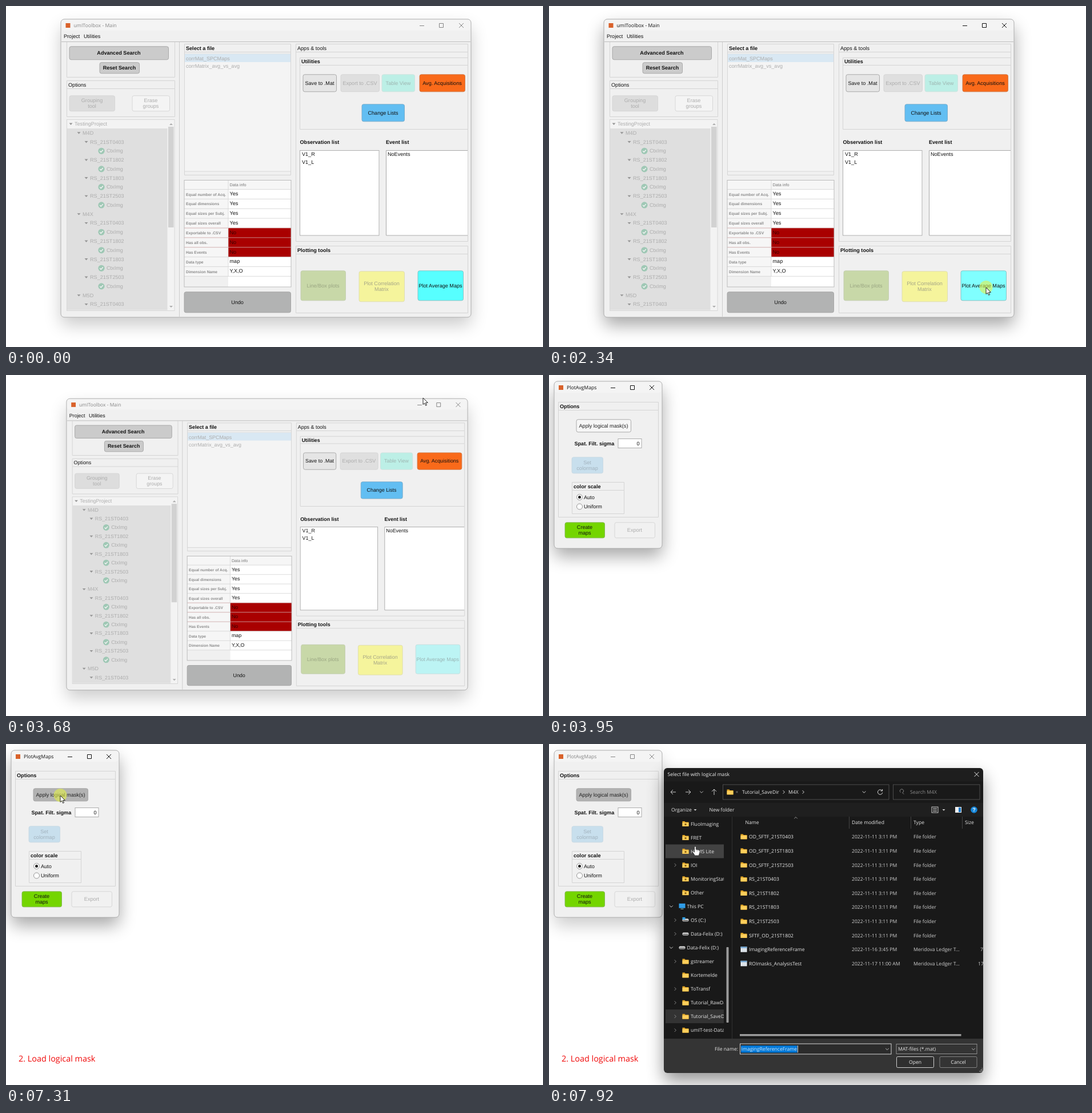
Recreate the animation shown at these times as an HTML page. Size 940 by 596 pixels, loop 7.99 s.

```html
<!DOCTYPE html>
<html lang="en">
<head>
<meta charset="utf-8">
<title>Average maps walkthrough</title>
<style>
html, body { margin: 0; width: 100%; height: 100%; overflow: hidden; background: #fff; }
svg { display: block; width: 100%; height: 100%; }
text { font-family: "Liberation Sans", Arial, sans-serif; white-space: pre; text-rendering: geometricPrecision; }
.ui { font-family: "Open Sans", "Noto Sans", sans-serif; }
.shadow { filter: blur(15px); opacity: var(--shade); }
.ink { fill: var(--ink); }
.inkline { fill: none; stroke: var(--ink); }
</style>
</head>
<body>
<svg id="stage" viewBox="0 0 940 596"></svg>
<script>
const LOOP = 7990;
const GREY = '#acacac', EDGE = '#d4d4d4';

// ---------- drawing helpers ----------
const box = (x, y, x2, y2, fill, stroke = 'none', r = 0) =>
  `<rect x="${x}" y="${y}" width="${x2 - x}" height="${y2 - y}" rx="${r}" fill="${fill}" stroke="${stroke}" stroke-width=".9"/>`;
const path = (d, stroke = EDGE, w = 1, fill = 'none') =>
  `<path d="${d}" fill="${fill}" stroke="${stroke}" stroke-width="${w}"/>`;
const text = (x, y, s, { size = 9.1, bold, fill = '#111', at = 'start', cls = '' } = {}) =>
  `<text x="${x}" y="${y}" font-size="${size}" font-weight="${bold ? 700 : 400}" fill="${fill}" text-anchor="${at}" class="${cls}">${s}</text>`;
const bold = (x, y, s) => text(x, y, s, { bold: true });
const ui = (x, y, s, fill = '#e6e6e6', size = 8.6) => text(x, y, s, { cls: 'ui', fill, size });
const group = (id, body, attrs = '') => `<g id="${id}" ${attrs}>${body}</g>`;

function button(x, y, x2, y2, fill, label, { ink = '#111', edge = '#a3a3a3', strong, id = '' } = {}) {
  const lines = label.split('|'), mid = (y + y2) / 2 + 3.1;
  const words = lines.map((s, i) =>
    text((x + x2) / 2, mid + (i - (lines.length - 1) / 2) * 10, s, { fill: ink, at: 'middle', bold: strong })).join('');
  return `<g ${id && `id="${id}"`}>${box(x + 1, y + .8, x2 - .5, y2 - .2, fill, edge, 3)}${words}</g>`;
}

function panel(x, y, x2, y2, title, strong = true) {
  return path(`M${x}.5 ${y}.5H${x2}.5V${y2}.5H${x}.5ZM${x}.5 ${y + 14}.5H${x2}.5`) +
    text(x + 3, y + 10.7, title, { bold: strong });
}

function frame(x, y, x2, y2, title, titleX, cy, marks) {
  const [lo, hi, end] = marks;
  return `<rect class="shadow" x="${x}" y="${y + 14}" width="${x2 - x}" height="${y2 - y}" rx="8"/>` +
    box(x, y, x2, y2, '#f0f0f0', '#a8a8a8', 6) +
    box(x + 1, y + 1, x2 - 1, y + 20, '#f4f4f4', 'none', 5) +
    box(titleX - 14, cy - 4, titleX - 6, cy + 4, '#d9622b') +
    text(titleX, cy + 3.2, title, { cls: 'ui ink', size: 8.7 }) +
    `<path class="inkline" d="M${lo} ${cy + .5}h8M${hi} ${cy - 3.5}h7v7h-7zM${end} ${cy - 4}l8 8m0-8l-8 8"/>`;
}

// ---------- main window ----------
function tree() {
  const rows = [[0, 'TestingProject']];
  for (const animal of ['M4D', 'M4X', 'M5D']) {
    rows.push([1, animal]);
    for (const run of ['0403', '1802', '1803', '2503']) rows.push([2, 'RS_21ST' + run], [3, 'CtxImg']);
  }
  let s = box(106.5, 198.5, 295, 532.5, '#f3f3f3', EDGE) + box(107, 214, 282.5, 531.5, '#dfdfdf') +
    box(284, 211, 293.5, 387, '#d2d2d2') +
    path('M286 208l3-3 3 3zM286 524l3 3 3-3z', 'none', 0, GREY);
  rows.slice(0, 21).forEach(([level, name], i) => {
    const y = 206 + i * 15.77, x = [120, 134, 147, 176][level];
    s += level < 3
      ? path(`M${x - 9.5} ${y - 1.5}h6l-3 3.4z`, 'none', 0, '#969696')
      : `<circle cx="167" cy="${y}" r="5.6" fill="#9fc8b5"/>` + path(`M164.2 ${y}l2 2.2 3.6-4`, '#f4f4f4', 1.4);
    s += text(x, y + 3, name, { fill: GREY });
  });
  return s;
}

function table() {
  const rows = [['Equal number of Acq.', 'Yes'], ['Equal dimensions', 'Yes'], ['Equal sizes per Subj.', 'Yes'],
    ['Equal sizes overall', 'Yes'], ['Exportable to .CSV', 'No'], ['Has all obs.', 'No'], ['Has Events', 'No'],
    ['Data type', 'map'], ['Dimension Name', 'Y,X,O']];
  const top = i => 320.5 + i * 16.88;
  let s = box(312, 304, 499, 491, '#f6f6f6') + box(389, 320.5, 499, 491, '#fff') + box(312, 472.5, 389, 491, '#f0f0f0') +
    text(391.5, 314.8, 'Data info', { size: 7.25, fill: '#777' });
  rows.forEach(([label, value], i) => {
    const y = top(i), no = value === 'No';
    if (no) s += box(389, y, 499, y + 16.88, '#a90000');
    s += text(315, y + 11.1, label, { size: 6.8, bold: true, fill: '#8c8c8c' }) +
      text(391.5, y + 10.8, value, { fill: no ? '#3a0000' : '#111' }) +
      path(`M312 ${y}H499`, no ? '#c9a0a0' : '#d2d2d2', .8);
  });
  return s + path(`M312 ${top(9)}H499M389 304V472.5`, EDGE, .8) + box(312, 304.5, 499, 491, 'none', '#b5b5b5');
}

const off = (ink, edge = EDGE) => ({ ink, edge });

const mainWindow = frame(96, 23, 814, 544, 'umIToolbox - Main', 118.5, 34, [724, 758.5, 793]) +
  text(101, 56.2, 'Project') + text(136, 56.2, 'Utilities') +
  path('M97 62.5H813', '#bdbdbd') + path('M303.5 63V543', '#cccccc') +
  path('M106.5 63V124.5H295.5V63') +
  button(110, 70, 285, 94, '#cbcbcb', 'Advanced Search', { strong: true }) +
  button(163, 98, 234, 118, '#cbcbcb', 'Reset Search', { strong: true }) +
  panel(106, 130, 295, 193, 'Options', false) +
  button(110, 156, 191, 184, '#dddddd', 'Grouping|tool', off(GREY)) +
  button(220, 156, 287, 184, '#f4f4f4', 'Erase|groups', off(GREY)) +
  tree() +
  panel(312, 66, 498, 295, 'Select a file') +
  box(312.5, 84, 498.5, 289, '#f4f4f4', EDGE) + box(313, 84, 498, 98, '#d9e8f3') +
  text(315, 95, 'corrMat_SPCMaps', { fill: GREY }) + text(315, 108.2, 'corrMatrix_avg_vs_avg', { fill: GREY }) +
  table() +
  button(311, 499, 499, 536, '#b2b3b3', 'Undo') +
  panel(507, 66, 808, 411, 'Apps &amp; tools', false) +
  path('M808 90.5H514.5V215.5H808M514 103.5H808') + bold(517, 100.2, 'Utilities') +
  button(519, 119, 579, 150, '#e5e5e5', 'Save to .Mat') +
  button(585, 119, 654, 150, '#dfdfdf', 'Export to .CSV', off(GREY)) +
  button(657, 119, 716, 150, '#bcefe6', 'Table View', off('#9db5b0', '#cfe2de')) +
  button(723, 119, 804, 150, '#f96a1a', 'Avg. Acquisitions', { edge: '#cf7745' }) +
  button(622, 171, 698, 202, '#62bef2', 'Change Lists', { edge: '#77a9c8' }) +
  bold(514.5, 241.3, 'Observation list') + bold(665, 241.3, 'Event list') +
  box(514.5, 252.5, 653, 401, '#fff', '#a8a8a8') + box(665, 252, 808, 401.5, '#fff') +
  path('M808 252.5H665.5V401H808', '#a8a8a8') +
  text(518, 262.3, 'V1_R') + text(518, 275.5, 'V1_L') + text(668, 262.3, 'NoEvents') +
  panel(507, 419, 808, 536, 'Plotting tools') +
  button(515, 462, 595, 515, '#c8d8a8', 'Line/Box plots', off('#9aa682', '#c3cdb0')) +
  button(617, 463, 698, 517, '#f5f49c', 'Plot Correlation|Matrix', off('#a5a587', '#dddcb0')) +
  button(720, 462, 801, 515, '#57ffff', 'Plot Average Maps', { id: 'plot', edge: '#83bfc1' });

// ---------- options window ----------
const radio = (y, label, on) =>
  `<circle cx="53.5" cy="${y}" r="5" fill="#fff" stroke="#8a8a8a" stroke-width=".9"/>` +
  (on ? `<circle cx="53.5" cy="${y}" r="2.5" fill="#222"/>` : '') + text(61, y + 3.2, label);

const optionWindow = frame(9, 11, 198, 303, 'PlotAvgMaps', 31, 22, [108, 142.5, 176]) +
  panel(16, 47, 191, 248, 'Options') +
  button(47, 77, 144, 100, '#f6f6f6', 'Apply logical mask(s)', { id: 'mask' }) +
  bold(44.5, 123.2, 'Spat. Filt. sigma') + box(121, 111.5, 162, 127.5, '#fff', '#a5a5a5') +
  text(158.5, 122.8, '0', { at: 'end' }) +
  button(39, 143, 95, 172, '#c8dfed', 'Set|colormap', off('#a2b2bd', '#c8d8e2')) +
  panel(40, 187, 131, 242, 'color scale') +
  radio(213.5, 'Auto', true) + radio(230, 'Uniform') +
  button(27, 257, 98, 285, '#74d500', 'Create|maps', { edge: '#83b552' }) +
  button(114, 257, 186, 285, '#f1f1f1', 'Export', off(GREY));

// ---------- file dialog ----------
const chevron = (x, y, turn = 0, c = '#bbb') =>
  `<path d="M-2.8 -1.4l2.8 2.8 2.8-2.8" fill="none" stroke="${c}" transform="translate(${x} ${y}) rotate(${turn})"/>`;
const folder = (x, y) =>
  path(`M${x} ${y - 4.5}h4l1.2 1.5h5.8v7.5h-11z`, 'none', 0, '#e0a526') + box(x, y - 2, x + 11, y + 4.2, '#ffcf5c');
const drive = (x, y) => box(x, y - 2.5, x + 11, y + 2.5, '#d8d8d8', 'none', 2) + box(x + 1, y, x + 10, y + 1.5, '#555');

function sidebar() {
  // [label, icon, chevron: 0 none, 1 closed, 2 open, top level]
  const rows = [['FluoImaging', 'b'], ['FRET', 'b'], ['HCMS Lite', 'b'], ['IOI', 'b', 1], ['MonitoringStation', 'b'], ['Other', 'b'],
    ['This PC', 'p', 2, 1], ['OS (C:)', 'o', 1], ['Data-Felix (D:)', 'd', 1], ['Data-Felix (D:)', 'd', 2, 1], ['gstreamer', 'f', 1],
    ['Kortemelde', 'f'], ['ToTransf', 'f', 1], ['Tutorial_RawData', 'f', 1], ['Tutorial_SaveDir', 'f', 1], ['umIT-test-Data', 'f', 1]];
  let s = box(204, 175.5, 306, 199.5, '#424242') + box(204, 464, 306, 488, '#333');
  rows.forEach(([label, icon, arrow, top], i) => {
    const y = 139.5 + i * 24.05, x = top ? 227.5 : 233.5;
    if (arrow) s += chevron(top ? 214 : 221, y, arrow === 1 ? -90 : 0, arrow === 1 ? '#888' : '#ccc');
    if (icon === 'p') s += box(x, y - 5, x + 11, y + 3, '#2f9de8') + box(x + 3, y + 4, x + 8, y + 5, '#9cc');
    else if (icon === 'f' || icon === 'b') s += folder(x, y) + (icon === 'b' ? box(x + 4, y - .5, x + 7, y + 2.5, '#8a6412') : '');
    else s += drive(x, y) + (icon === 'o' ? box(x, y - 5, x + 5, y - 1, '#35a4ea') : '');
    s += ui(top ? 241.5 : 248, y + 3.1, label);
  });
  return `<g clip-path="url(#sideClip)">${s}</g>` + box(310.5, 355, 314.5, 487, '#9b9b9b', 'none', 1) + path('M320.5 127V515', '#303030');
}

function files() {
  const names = ['OD_SFTF_21ST0403', 'OD_SFTF_21ST1803', 'OD_SFTF_21ST2503', 'RS_21ST0403', 'RS_21ST1802', 'RS_21ST1803',
    'RS_21ST2503', 'SFTF_OD_21ST1802', 'ImagingReferenceFrame', 'ROImasks_AnalysisTest'];
  const dates = { 8: '2022-11-16 3:45 PM', 9: '2022-11-17 11:00 AM' };
  let s = ui(343.5, 140.3, 'Name') + ui(530, 140.3, 'Date modified') + ui(638, 140.3, 'Type') + ui(728, 140.3, 'Size') +
    path('M525.5 127V148M633.5 127V148M723.5 127V148', '#444') + chevron(432, 129, 180, '#999');
  names.forEach((name, i) => {
    const y = 162 + i * 24.65, doc = i > 7;
    s += (doc ? box(335.5, y - 5, 346.5, y + 4.5, '#e8edf2') + box(335.5, y - 5, 346.5, y - 2.5, '#6fa3cf') +
      path(`M339.5 ${y - 2}v6M343 ${y - 2}v6`, '#aab6c0', .7) : folder(335.5, y)) +
      ui(350, y + 3.2, name) + ui(530, y + 3.2, dates[i] || '2022-11-11 3:11 PM', '#cfcfcf') +
      ui(638, y + 3.2, doc ? 'Meridova Ledger T...' : 'File folder', '#cfcfcf');
  });
  return s + ui(755, 362.4, '7', '#cfcfcf') + ui(751, 387, '17', '#cfcfcf');
}

const fileField = box(334.5, 524, 599, 542, '#2b2b2b', '#e8e8e8') + box(336, 527, 434.5, 539.5, '#0078d7') +
  ui(336.5, 536.4, 'ImagingReferenceFrame', '#d8ecff');

const emptyBody = box(203, 127, 319.5, 515, '#191919') + box(311, 140, 315, 363, '#8e8e8e') + path('M208 187.5H299', '#333') +
  box(334.5, 502.5, 748.5, 515, '#1b1b1b') + box(334.5, 507, 721, 510.5, '#8e8e8e') +
  box(202, 515, 760, 575, '#373737') + box(290, 526.5, 330.5, 539.5, '#fff') + fileField + box(585, 524, 599.5, 542, '#fff') +
  box(607.5, 524, 749.5, 541.5, '#fff') + box(607.5, 546, 674, 566, '#fff') + box(683, 546, 749.5, 566, '#fff') +
  box(748.5, 562.5, 760, 575, '#fff');

const fullBody = box(201, 65, 760, 515, '#191919') + box(201, 103, 760, 127, '#1f1f1f') +
  path('M222 84h-9m4-4l-4 4 4 4M239 84h9m-4-4l4 4-4 4M289 89v-10m-4 4l4-4 4 4', '#ccc') + chevron(267, 84) +
  box(304.5, 71, 595, 97, '#191919', '#535353') + folder(311.5, 84) + ui(327, 86, '«', '#999', 8) +
  group('crumbs', ui(338, 87.2, 'Tutorial_SaveDir') + chevron(411, 84, -90, '#ddd') + ui(419, 87.2, 'M4X') + chevron(445, 84, -90, '#ddd')) +
  chevron(551.5, 84, 0, '#ddd') + path('M583 81.5a4.2 4.2 0 1 0 .8 3.4M583.6 79v3h-3', '#ddd') +
  box(602.5, 71, 754, 97, '#191919', '#535353') + path('M618.6 85.1a3.2 3.2 0 1 0-3-.4M618.6 85.1l2.6 2.6', '#888') +
  ui(632, 87.2, 'Search M4X', '#8c8c8c') +
  ui(214, 118.3, 'Organize') + ui(280.5, 118.3, 'New folder') +
  path('M253.5 114h5l-2.5 2.8zM688.5 114h5l-2.5 2.8z', 'none', 0, '#ccc') +
  box(670, 110, 681, 120, 'none', '#ddd') + path('M672 112.5h7M672 115h7M672 117.5h7', '#ddd', .9) +
  box(711, 110, 722, 120, '#eee') + box(717, 111, 721, 119, '#1679c9') +
  '<circle cx="744" cy="115" r="5.8" fill="#1686d9"/>' + text(744, 118.2, '?', { at: 'middle', fill: '#fff', bold: true }) +
  sidebar() + files() + box(334, 507, 721.5, 510.5, '#9b9b9b') +
  box(201, 515, 760, 575, '#343434') + ui(290, 536.4, 'File name:') + fileField + path('M435.5 527V539.5', '#fff', .8) + chevron(592, 533.3) +
  box(608, 524.5, 749, 541.5, '#343434', '#9a9a9a') + ui(611, 536.4, 'MAT-files (*.mat)') + chevron(743, 533.3) +
  box(608.5, 546.5, 673.5, 565.5, '#2f2f2f', '#e2e2e2', 2) + box(684, 546.5, 749, 565.5, '#343434', '#8d8d8d', 2) +
  text(641, 559.2, 'Open', { cls: 'ui', size: 8.6, fill: '#eee', at: 'middle' }) +
  text(716.5, 559.2, 'Cancel', { cls: 'ui', size: 8.6, fill: '#eee', at: 'middle' }) +
  path('M753 572h6M755.5 569.5h3.5M757.5 567h1.5', '#aaa', 1.2);

const fileDialog = '<rect class="shadow" x="201" y="56" width="559" height="533" rx="8"/>' +
  `<g clip-path="url(#dialogClip)">${box(201, 42, 760, 575, '#fff')}${group('empty', emptyBody)}${group('full', fullBody)}` +
  box(201, 42, 760, 65.5, '#1e1e1e') + ui(207.5, 56.4, 'Select file with logical mask', '#f2f2f2') +
  path('M744.5 49l8 8m0-8l-8 8', '#eee') + '</g>';

// ---------- pointer ----------
const pointer = group('arrow', path('M0 0V11.6L2.7 9.1 4.6 13.4 6.5 12.6 4.6 8.4H8.4Z', '#111', .9, '#fff')) +
  group('hand', path('M-1.3 1.2a1.3 1.3 0 0 1 2.6 0V5.2l5 1.1q1.9.5 1.7 2.4L7.2 12.5 6.2 16H-.8L-2.4 13-5 9.6q.6-1.8 2.4-.7l1.3 1.3Z', '#222', .7, '#fff') +
    path('M2.8 6V8.5M5 6.6V8.8', '#555', .5));

const caption = (id, s) => group(id, text(22, 555, s, { cls: 'ui', size: 14.4, fill: '#f00808' }));

document.getElementById('stage').innerHTML =
  '<defs><clipPath id="sideClip"><rect x="203" y="127" width="103" height="388"/></clipPath>' +
  '<clipPath id="dialogClip"><rect x="201" y="42" width="559" height="533" rx="6"/></clipPath></defs>' +
  group('main', mainWindow) + group('options', optionWindow) + group('dialog', fileDialog, 'style="--shade:.42"') +
  caption('step1', '1. Open plot tool') + caption('step2', '2. Load logical mask') +
  '<circle id="click" r="11.5" fill="#e2f04a" opacity=".6"/>' + group('pointer', pointer);

// ---------- timing ----------
const $ = id => document.getElementById(id);
const during = (t, from, to) => t >= from && t < to;
const show = (id, on) => { $(id).style.display = on ? '' : 'none'; };

const firstMove = [[1050, 873, 592], [1180, 871, 587], [1320, 869, 585], [1600, 836, 548], [1980, 765, 492],
  [2500, 765, 492], [2700, 768, 430], [3100, 744, 110], [3400, 730, 40]];
const secondMove = [[6220, 575, 46], [6290, 575, 46], [6450, 642, 220], [6610, 560, 431], [6790, 260, 300],
  [6960, 24, 130], [7110, 95, 90], [7360, 95, 90], [7600, 239, 182], [7660, 239, 182], [7790, 242, 182], [7920, 256, 179]];
// time, scale, shift x, shift y, opacity
const minimise = [[3610, 1, 0, 0, 1], [3680, .978, 2, 12.5, 1], [3765, .978, 2, 12.5, 1], [3770, .86, 8, 80, .45], [3850, .7, 14, 150, 0]];
const openOptions = [[3820, .9, 0, 0, 0], [3950, 1, 0, 0, 1]];
const openDialog = [[7470, .88, 2.5, 5, 0], [7600, .957, 1, 2, 1], [7660, .957, 1, 2, 1], [7720, 1, 0, 0, 1]];

function at(track, t) {
  const next = track.findIndex(k => k[0] > t);
  if (next < 0) return track[track.length - 1].slice(1);
  if (next === 0) return track[0].slice(1);
  const a = track[next - 1], b = track[next], p = (t - a[0]) / (b[0] - a[0]);
  return a.slice(1).map((v, i) => v + (b[i + 1] - v) * p);
}

function pose(id, track, t, cx, cy) {
  const [scale, dx, dy, opacity] = at(track, t);
  show(id, opacity > 0);
  $(id).setAttribute('transform', `translate(${cx + dx} ${cy + dy}) scale(${scale}) translate(${-cx} ${-cy})`);
  $(id).setAttribute('opacity', opacity);
}

function focus(id, on) {
  $(id).style.setProperty('--ink', on ? '#111' : '#858585');
  $(id).style.setProperty('--shade', on ? .34 : .2);
}

function paint(id, fill, ink, edge) {
  const shape = $(id).querySelector('rect');
  shape.setAttribute('fill', fill);
  shape.setAttribute('stroke', edge);
  $(id).querySelector('text').setAttribute('fill', ink);
}

function draw(t) {
  pose('main', minimise, t, 455, 283.5);
  pose('options', openOptions, t, 103.5, 157);
  pose('dialog', openDialog, t, 480.5, 308.5);
  focus('main', during(t, 2340, 2870));
  focus('options', t < 7400);

  if (t >= 2600) paint('plot', '#bcf4f4', '#98b3b3', '#c4dede');
  else paint('plot', t >= 1900 ? '#80ffff' : '#57ffff', '#111', '#83bfc1');
  paint('mask', t >= 7200 ? '#b2b2b2' : '#f6f6f6', '#222', '#a3a3a3');

  show('step1', during(t, 70, 2040));
  show('step2', t >= 4880);
  show('empty', t < 7725);
  show('full', t >= 7725);
  show('crumbs', t >= 7850);

  const [x, y] = at(t < 5000 ? firstMove : secondMove, t);
  $('pointer').setAttribute('transform', `translate(${x} ${y})`);
  show('pointer', during(t, 1050, 3850) || t >= 6220);
  show('arrow', t < 7530);
  show('hand', t >= 7530);
  $('click').setAttribute('cx', x);
  $('click').setAttribute('cy', y - .5);
  show('click', during(t, 2340, 2500) || during(t, 7160, 7340));
}

const start = performance.now();
function tick() {
  draw((performance.now() - start) % LOOP);
  requestAnimationFrame(tick);
}
tick();
</script>
</body>
</html>
```
